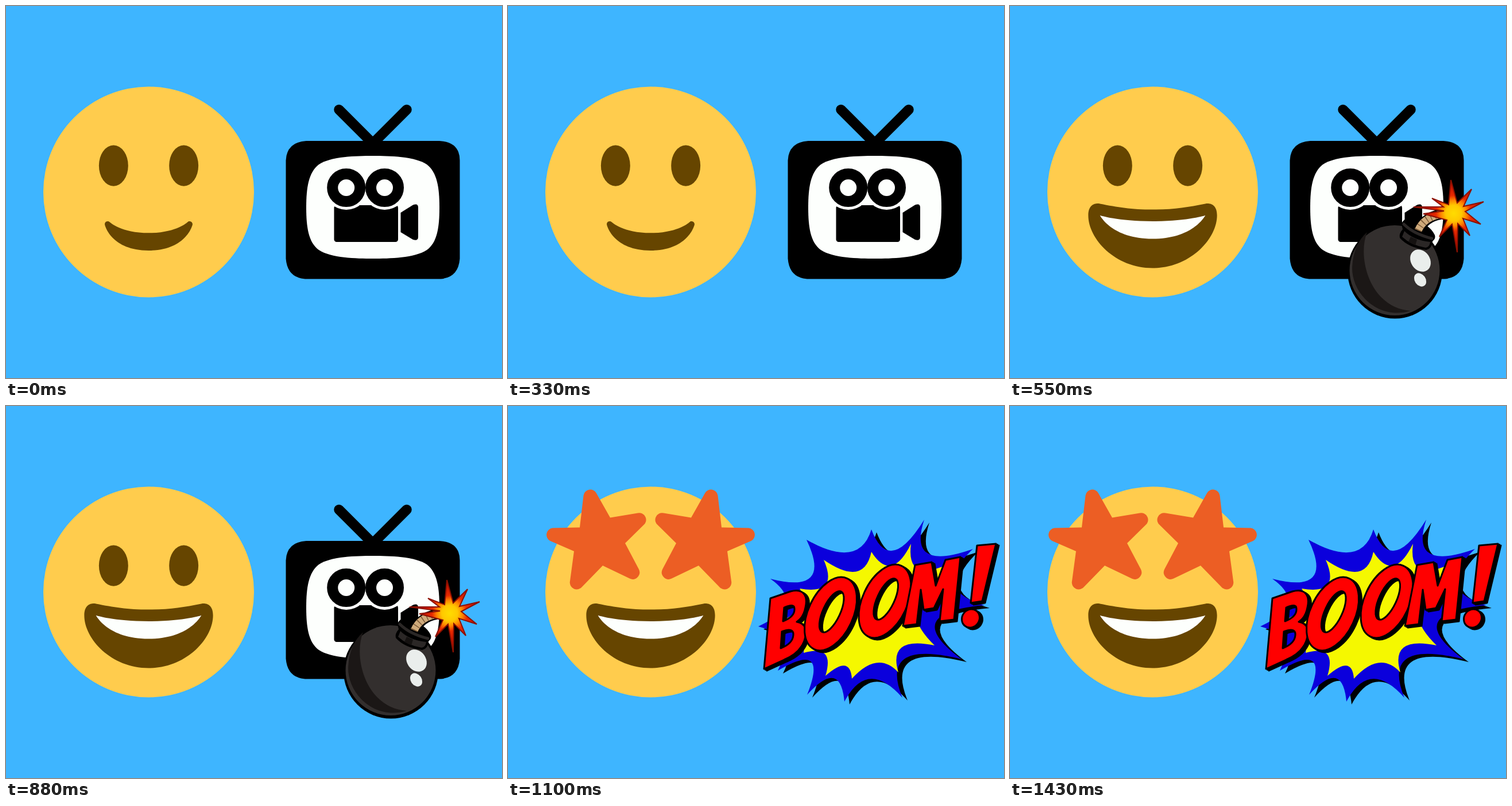
An HTML page for the animation above (1650 ms loop, 864 by 648 pixels).

```html
<!DOCTYPE html>
<html lang="en">
<head>
<meta charset="utf-8">
<title>Boom</title>
<style>
html, body { margin: 0; width: 100%; height: 100%; overflow: hidden; background: #3eb5ff; }
svg { display: block; width: 100%; height: 100%; }
</style>
</head>
<body>
<svg viewBox="0 0 864 648">
  <defs>
    <radialGradient id="fire" gradientUnits="userSpaceOnUse" cx="773" cy="361" r="50">
      <stop offset="0" stop-color="#ffdc00"/>
      <stop offset=".28" stop-color="#ffc800"/>
      <stop offset=".45" stop-color="#ff8500"/>
      <stop offset=".62" stop-color="#e82a00"/>
      <stop offset="1" stop-color="#c01000"/>
    </radialGradient>
    <path id="star" d="M125 211.500L131.500 156A12 12 0 0 1 154 152L178 194.500L226 186.500A12 12 0 0 1 235.500 208L204 239L228 284.500A12 12 0 0 1 212 300.500L165 278L129.500 314.500A12 12 0 0 1 108 305L115 253L73.500 235A12 12 0 0 1 77.500 212.500Z"/>
    <path id="burst" d="M633 215Q664 297 725 198Q695 290 810 249Q735 320 830 347Q680 360 790 441Q645 405 687 508Q626 439 586 515Q579 439 521 503Q559 408 470 461Q500 400 436 384Q520 345 457 301Q566 329 520 233Q612 285 633 215Z"/>
    <path id="o" d="M-39 0A39 68 0 1 1 39 0A39 68 0 1 1 -39 0ZM-15 -4A15 39 0 1 0 15 -4A15 39 0 1 0 -15 -4Z"/>
    <g id="word" fill-rule="evenodd" stroke-linejoin="round">
      <path d="M457 335L492 323C514 317 523 330 518 351Q515 368 503 376Q520 379 519 395C517 420 500 434 481 442L446 458ZM481 351L479 375Q500 367 499 353Q499 343 481 351ZM477 393L475 422Q496 414 497 399Q498 385 477 393Z"/>
      <use href="#o" transform="translate(562 362) rotate(25)"/>
      <use href="#o" transform="translate(656.500 340) rotate(25)"/>
      <path d="M709 277L738 272L745 313L762 268L788 263L777 372L752 375L758 319L742 352L724 355L719 320L712 380L688 383Z"/>
      <path d="M817 243L850 240L826 340L806 343Z"/>
      <ellipse cx="806" cy="370" rx="15" ry="16.500" transform="rotate(35 806 370)"/>
    </g>
  </defs>

  <rect width="864" height="648" fill="#3eb5ff"/>
  <circle cx="248.500" cy="324" r="183.500" fill="#ffcc4d"/>
  <g transform="translate(65 140.500) scale(10.194)" fill="#664500">
    <g id="eyes">
      <ellipse cx="12" cy="13.500" rx="2.500" ry="3.500"/>
      <ellipse cx="24" cy="13.500" rx="2.500" ry="3.500"/>
    </g>
    <path id="smile" d="M10.515 23.621C10.56 23.8 11.683 28 18 28c6.318 0 7.44-4.2 7.485-4.379.055-.217-.043-.442-.237-.554-.195-.111-.439-.078-.6.077C24.629 23.163 22.694 25 18 25s-6.63-1.837-6.648-1.855C11.256 23.05 11.128 23 11 23c-.084 0-.169.021-.246.064-.196.112-.294.339-.239.557z"/>
    <g id="grin">
      <path d="M18 21c-3.623 0-6.027-.422-9-1-.679-.131-2 0-2 2 0 4 4.595 9 11 9 6.404 0 11-5 11-9 0-2-1.321-2.132-2-2-2.973.578-5.377 1-9 1z"/>
      <path fill="#fdfffd" d="M9 22s3 1 9 1 9-1 9-1-2 4-9 4-9-4-9-4z"/>
    </g>
  </g>
  <g id="stars" fill="#ec5e24">
    <use href="#star"/>
    <use href="#star" transform="translate(497 0) scale(-1 1)"/>
  </g>

  <g id="tv">
    <path d="M580 180.500L639 239.500L698 180.500" fill="none" stroke="#000" stroke-width="17.500" stroke-linecap="round"/>
    <path d="M523 235H755Q790.500 237 790.500 269V440Q788 473 757 475.500H521Q490 473 487.500 440V269Q489 237 523 235Z"/>
    <path fill="#fdfffd" d="M523 351C523 316 527 290 545 276C566 262 610 261 639 261S712 262 733 276C751 290 755 316 755 351S751 412 733 425C712 439 668 440 639 440S566 439 545 425C527 412 523 386 523 351Z"/>
    <rect x="571.500" y="347" width="111.500" height="64" rx="4.500"/>
    <path d="M687.500 360L709 346.500Q718 343 718 351V402Q718 410 709 407L687.500 394Z"/>
    <g fill="#fdfffd">
      <circle cx="592.700" cy="316.500" r="38.500"/>
      <circle cx="659.500" cy="316.500" r="38.500"/>
    </g>
    <g fill="none" stroke="#000" stroke-width="19">
      <circle cx="592.700" cy="316.500" r="24"/>
      <circle cx="659.500" cy="316.500" r="24"/>
    </g>
  </g>

  <g id="bomb">
    <circle cx="670.500" cy="462" r="82.500"/>
    <circle cx="670" cy="460.500" r="78.500" fill="#332f2e"/>
    <path fill="#1b1716" d="M622 394C604 440 628 526 698 531C640 548 595 500 596 455Q598 415 622 394Z"/>
    <g fill="#eaeeec">
      <ellipse cx="715" cy="443.500" rx="16.500" ry="20.500" transform="rotate(-35 715 443.500)"/>
      <ellipse cx="714.500" cy="477" rx="9.500" ry="12.500" transform="rotate(-35 714.500 477)"/>
    </g>
    <path d="M682 380Q686 367 702 372Q731 380 740 399Q742 405 736 410Q735 423 725 425Q694 421 679 404Q677 397 684 389Z"/>
    <path fill="#2b2726" d="M687 392Q703 408 732 411Q731 420 724 421Q699 417 683 402Z"/>
    <path fill="#151211" d="M698 402L709 407L706 417L694 411Z"/>
    <path d="M686 380Q703 397 735 405" fill="none" stroke="#2b2726" stroke-width="5" stroke-linecap="round"/>
    <g fill="none">
      <path d="M711 393Q721 368 750 363" stroke="#000" stroke-width="18"/>
      <path d="M711 391Q721 368 750 363" stroke="#cfaa7b" stroke-width="13"/>
      <path d="M711 391Q721 368 750 363" stroke="#795735" stroke-width="13" stroke-dasharray="1.500 6.500"/>
    </g>
    <path fill="url(#fire)" stroke="#8c1000" stroke-width="2" d="M768 303L779 343L804 319L790 349L825 341L793 358L820 380L789 370L801 400L780 379L779 429L770 380L748 402L761 373L720 362L756 357L703 350L755 350L735 335L764 346Z"/>
  </g>

  <g id="boom" role="img" aria-label="BOOM!">
    <use href="#burst" transform="translate(9 5)"/>
    <use href="#burst" fill="#0b00dc"/>
    <path fill="#f5f800" d="M550 268Q620 316 633 254Q668 309 702 240Q693 310 768 275Q740 320 775 340Q670 345 743 417Q661 400 680 464Q644 425 599 475Q596 432 553 470Q570 414 515 430Q520 390 475 375Q530 350 508 318Q577 330 550 268Z"/>
    <g stroke="#000" stroke-width="3">
      <use href="#word" transform="translate(5 3)"/>
      <use href="#word" transform="translate(2.500 1.500)"/>
      <use href="#word" fill="#f00"/>
    </g>
  </g>
</svg>
<script>
const STEP = 550;
const scenes = {
  eyes: [0, 1], smile: [0], grin: [1, 2], stars: [2],
  tv: [0, 1], bomb: [1], boom: [2]
};
const parts = Object.entries(scenes).map(([id, on]) => [document.getElementById(id), on]);

function draw(ms) {
  const scene = Math.floor(ms / STEP) % 3;
  for (const [el, on] of parts) el.style.display = on.includes(scene) ? "" : "none";
}

const start = performance.now();
function tick() {
  draw(performance.now() - start);
  requestAnimationFrame(tick);
}
draw(0);
requestAnimationFrame(tick);
</script>
</body>
</html>
```
